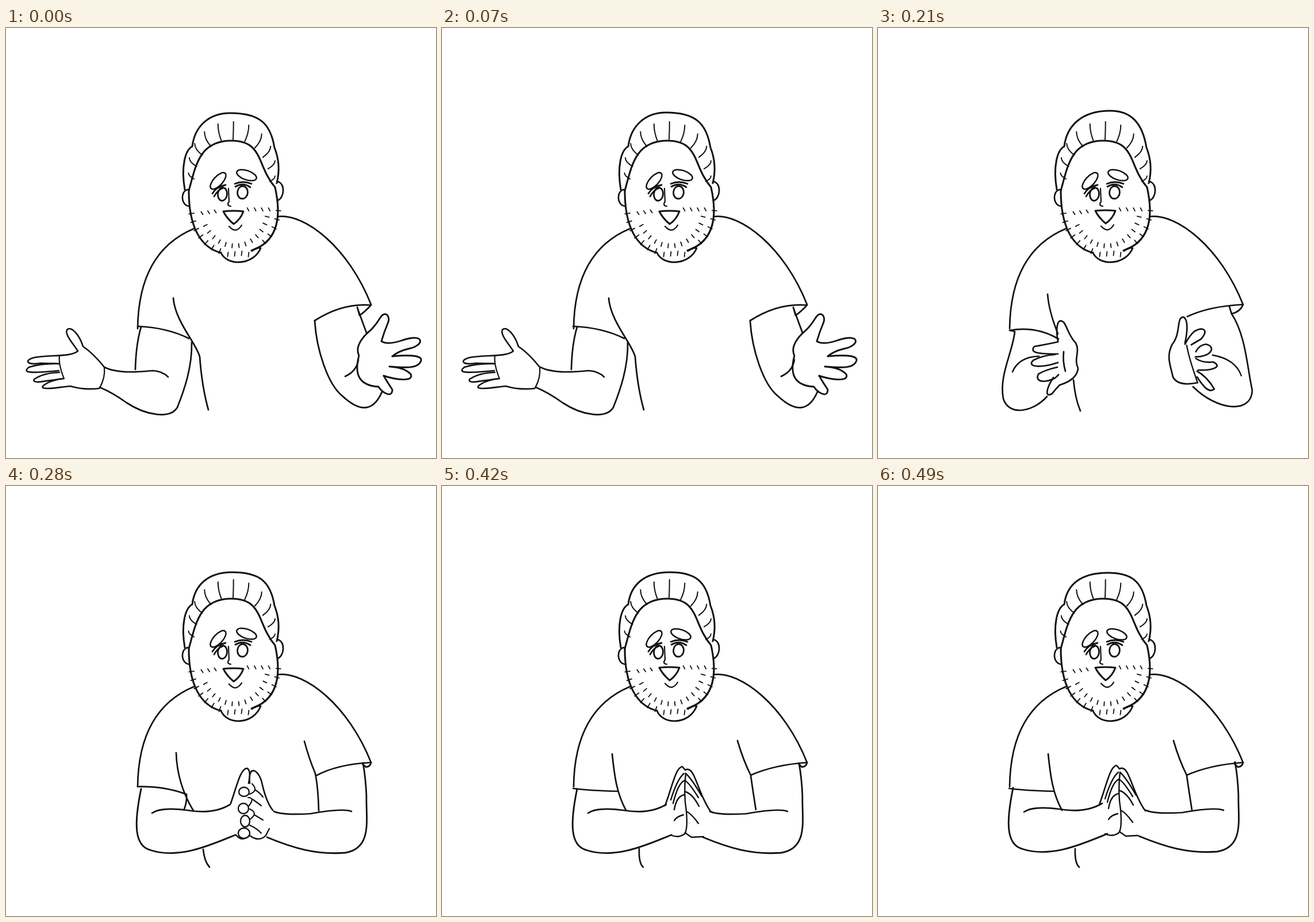
Write an HTML page with a canvas that moves like this. It is 748 px wide and 748 px high and loops after 560 ms.

```html
<!DOCTYPE html>
<html lang="en">
<head>
<meta charset="utf-8">
<title>Hands together</title>
<style>
html, body { margin: 0; width: 100%; height: 100%; overflow: hidden; background: #fff; }
canvas { display: block; width: 100vmin; height: 100vmin; }
</style>
</head>
<body>
<canvas id="stage" width="748" height="748"></canvas>
<script>
const ctx = document.getElementById('stage').getContext('2d');
const STEP = 70;

function line(d, width = 2.7, dx = 0, dy = 0) {
  ctx.save();
  ctx.translate(dx, dy);
  ctx.lineWidth = width;
  ctx.stroke(new Path2D(d));
  ctx.restore();
}

function oval(x, y, rx, ry, width = 2.5, tilt = 0) {
  ctx.lineWidth = width;
  ctx.beginPath();
  ctx.ellipse(x, y, rx, ry, tilt, 0, 7);
  ctx.stroke();
}

// Combed strands stand on the oval hairline and lean outwards.
function drawStrands() {
  for (let i = 0; i < 11; i++) {
    const t = i * 0.308, lean = 0.75 * Math.cos(t), length = 13 + 18 * Math.sin(t);
    const x = 393 + 66 * Math.cos(t), y = 267 - 73 * Math.sin(t);
    const endX = x + length * Math.sin(lean), endY = y - length * Math.cos(lean);
    line(`M${x} ${y}Q${endX} ${(y + endY) / 2} ${endX} ${endY}`, 2);
  }
}

function tick(x, y, angle, length) {
  const cx = Math.cos(angle) * length / 2, cy = Math.sin(angle) * length / 2;
  line(`M${x - cx} ${y - cy}L${x + cx} ${y + cy}`, 1.8);
}

// Stubble along an arc of the jaw, angles in degrees.
function stubbleArc(rx, ry, from, to, step, length) {
  for (let a = from; a <= to; a += step) {
    const t = a * Math.PI / 180;
    tick(398 + rx * Math.cos(t), 312 + ry * Math.sin(t), t, length);
  }
}

function drawStubble() {
  stubbleArc(76, 81, 4, 50, 11, 8);
  stubbleArc(76, 81, 110, 173, 10.4, 9);
  stubbleArc(58, 67, 14, 156, 11.5, 7);
  for (let i = 0; i < 4; i++) {
    tick(386 + 12 * i, 394 - i % 3, 1.7, 8);
    tick(421 + 12.3 * i, 315.5, 1.1, 6);
    if (i < 3) tick(341 + 11.5 * i, 322 - 1.5 * i, 1, 6);
  }
}

function drawHead({ top: [topX, topY], brow: [browX, browY], lips, chin }) {
  line(`M311 281C304 240 312 212 324 206C328 172 352 ${topY} ${topX} ${topY}` +
    `C440 ${topY} 460 165 467 208C475 228 476 250 471 270`, 3);
  drawStrands();
  line('M318 283C330 240 336 196 392 196C448 196 436 240 468 277C480 330 472 372 427 387', 3.1);
  line('M318 283C318 345 338 382 374 391', 3.1);
  line('M316 281C303 284 304 308 318 310M472 267C487 270 484 297 472 300');
  line(`M374 391C384 ${chin + 6} 430 ${chin + 6} 443 383Q436 381 428 388`, 2.9);
  oval(369, 266, 18, 8, 2.5, -0.83);
  oval(418.5 + browX, 256 + browY, 18, 8, 2.5, 0.33);
  oval(376.5, 289, 8, 11.5, 2.8, 0.1);
  oval(411.5, 286, 9, 11, 2.8, 0.1);
  line('M359 288Q366 276 382 273M362 293Q368 282 378 278', 2.8);
  line('M398 271Q412 265 427 271M399 276Q412 268 425 277', 2.8);
  line('M387 279L388 302Q383 309 391 310', 2.2);
  line('M378 319Q396 317 413 319Q408 333 396 341Q384 331 378 319Z', 3, 0, lips);
  line('M388 345Q400 359 410 343', 2.3, 0, lips / 2);
  drawStubble();
}

function drawShoulders() {
  line('M327 349C262 376 230 434 229 523');
  line('M473 328C520 322 596 382 635 481');
}

function drawOpen(dx) {
  line('M229 519Q280 521 318 540M635 482Q585 478 537 509', 2.7, dx);
  line('M291 470C294 510 332 550 337 572Q341 625 352 664', 2.8, dx);
  // Left arm and hand
  line('M235 520Q226 550 225 594M171 590C195 602 235 598 255 596Q272 597 282 607');
  line('M323 547C324 590 310 630 298 660C286 680 245 675 210 652Q185 634 163 625');
  line('M171 590Q152 566 134 554C128 535 114 517 106 525C102 533 116 548 125 562' +
    'C112 573 75 568 50 573C30 578 36 587 60 583L93 584', 2.6, dx);
  line('M92 584Q62 583 40 590C27 600 42 601 92 596M93 599Q65 600 49 611C45 620 66 614 99 610', 2.6, dx);
  line('M99 610Q75 613 64 623C60 631 90 625 112 623Q135 630 162 627', 2.6, dx);
  line('M93 570Q91 585 101 610M171 590Q173 608 163 626', 2.2, dx);
  // Right arm and hand
  line('M537 509C540 560 560 620 585 640Q632 684 654 633', 2.8, dx);
  line('M611 486Q617 503 627 530M590 606Q610 597 613 577M635 482Q625 493 615 500L611 486');
  line('M628 531Q640 522 651 504C660 490 670 502 664 514Q658 528 653 545' +
    'Q665 552 690 543C730 530 728 553 700 558Q683 562 672 571', 2.9, dx);
  line('M672 571Q730 566 721 581C714 594 690 590 667 589Q692 590 704 602C710 614 685 614 657 605', 2.9, dx);
  line('M657 605Q664 617 672 629C672 645 654 634 648 624C612 622 606 600 614 570Q606 553 628 531', 2.9, dx);
}

function drawApproaching() {
  line('M229 526Q275 518 314 541M635 481Q576 484 538 502');
  line('M295 463Q297 492 313 532M340 612Q343 645 352 666');
  // Left arm and hand
  line('M229 526L238 528C234 565 210 605 218 645C228 676 270 668 294 641M234 598Q245 572 280 571');
  line('M313 545C309 525 311 500 324 513C332 528 334 538 344 548C352 563 340 575 348 592' +
    'Q346 612 316 621Q309 628 303 636C290 644 292 628 305 608');
  line('M313 546Q290 551 272 554C262 566 283 567 313 567M308 568Q288 569 270 578C258 590 283 592 313 582');
  line('M312 590Q290 595 279 602C270 620 304 617 314 603M323 563Q321 580 326 597');
  // Right arm and hand
  line('M635 481Q630 494 615 497L611 484M615 497C640 535 642 590 651 630C650 672 590 666 548 624');
  line('M534 548C538 530 540 508 532 503C518 502 528 530 512 550C500 572 510 590 513 607Q522 624 556 617');
  line('M534 550Q542 535 550 528C566 518 576 526 562 541L545 551M553 563Q558 552 570 550C588 553 582 572 552 572');
  line('M553 575Q565 583 583 581C600 589 583 596 557 595M555 597Q572 606 585 628C576 636 566 624 555 607');
  line('M537 552Q541 575 556 617M582 569Q622 576 632 605', 2.3);
}

function drawFoldedArms(dy) {
  line('M235 527C222 590 224 625 250 633C300 650 355 625 399 607', 2.9, 0, dy);
  line('M254 569Q270 558 315 564Q360 572 390 554M466 566Q480 573 530 570Q585 560 601 566', 2.7, 0, dy);
  line('M454 611C500 630 540 642 590 638C638 630 626 580 627 540Q626 510 621 482', 2.8, 0, dy);
  line('M635 481Q634 488 626 489L620 483');
}

function drawMeeting() {
  line('M229 523Q275 522 313 536M635 481Q576 484 539 504');
  line('M296 464C297 500 308 535 326 565M343 632Q345 653 354 663M314 536Q315 550 310 562');
  line('M519 444Q527 474 538 500Q543 525 544 565');
  drawFoldedArms(0);
  line('M391 552C402 520 408 492 419 491Q427 494 422 517M424 517C420 485 440 490 446 520Q453 550 464 564');
  line('M428 518Q440 530 424 536M434 529Q441 533 447 541M421 542Q434 542 422 557M429 545L444 556', 2.2);
  line('M424 562Q440 569 424 580M432 572L447 581M424 590Q437 596 444 604', 2.2);
  line('M400 607Q410 620 424 608Q440 620 452 608L458 596', 2.3);
  oval(414, 532, 9, 8, 2.3);
  oval(413, 561, 9, 9, 2.3);
  oval(416, 583, 8, 10, 2.3);
  oval(414, 604, 10, 9, 2.3);
}

function drawPraying(dx, dy) {
  line('M228 526Q255 530 306 531M635 481Q578 485 537 503');
  line('M296 466C300 505 304 535 320 564M343 631Q342 656 350 663');
  line('M514 443Q524 477 537 503Q540 525 546 563');
  drawFoldedArms(dy);
  line('M388 556C400 525 406 490 418 488L423 494M423 494C440 484 444 535 468 567', 2.6, dx, dy);
  line('M421 500Q409 510 398 546M423 512Q411 515 402 552M422 537Q408 539 404 563M420 572Q408 575 404 582', 2.4, dx, dy);
  line('M424 500Q420 535 425 565Q428 600 421 606Q410 613 398 607', 2.4, dx, dy);
  line('M424 500Q435 510 452 540M422 512Q430 516 446 542M424 532Q436 536 447 557', 2.4, dx, dy);
  line('M425 566Q434 570 446 587M424 604L434 611L455 610', 2.4, dx, dy);
}

const poses = [
  { body: () => drawOpen(0), top: [390, 148], brow: [0, 0], lips: 0, chin: 408 },
  { body: () => drawOpen(-1), top: [390, 147], brow: [0, 0], lips: 0, chin: 408 },
  { body: () => drawOpen(-2), top: [390, 146], brow: [1, 1], lips: -1, chin: 407 },
  { body: drawApproaching, top: [404, 144], brow: [-1, 0], lips: -1, chin: 408 },
  { body: drawMeeting, top: [393, 150], brow: [0, 1], lips: -1, chin: 410 },
  { body: () => drawPraying(0, 1), top: [394, 150], brow: [-1, 2], lips: -2, chin: 410 },
  { body: () => drawPraying(0, 0), top: [396, 150], brow: [-3, 2], lips: -3, chin: 410 },
  { body: () => drawPraying(-3, -2), top: [400, 151], brow: [-3, 2], lips: -3, chin: 410 }
];

function render(time) {
  const pose = poses[Math.floor(time / STEP) % poses.length];
  ctx.fillStyle = '#fff';
  ctx.fillRect(0, 0, 748, 748);
  ctx.strokeStyle = '#111';
  ctx.lineCap = ctx.lineJoin = 'round';
  drawShoulders();
  pose.body();
  drawHead(pose);
}

const start = performance.now();
function loop() {
  render(performance.now() - start);
  requestAnimationFrame(loop);
}
loop();
</script>
</body>
</html>
```
